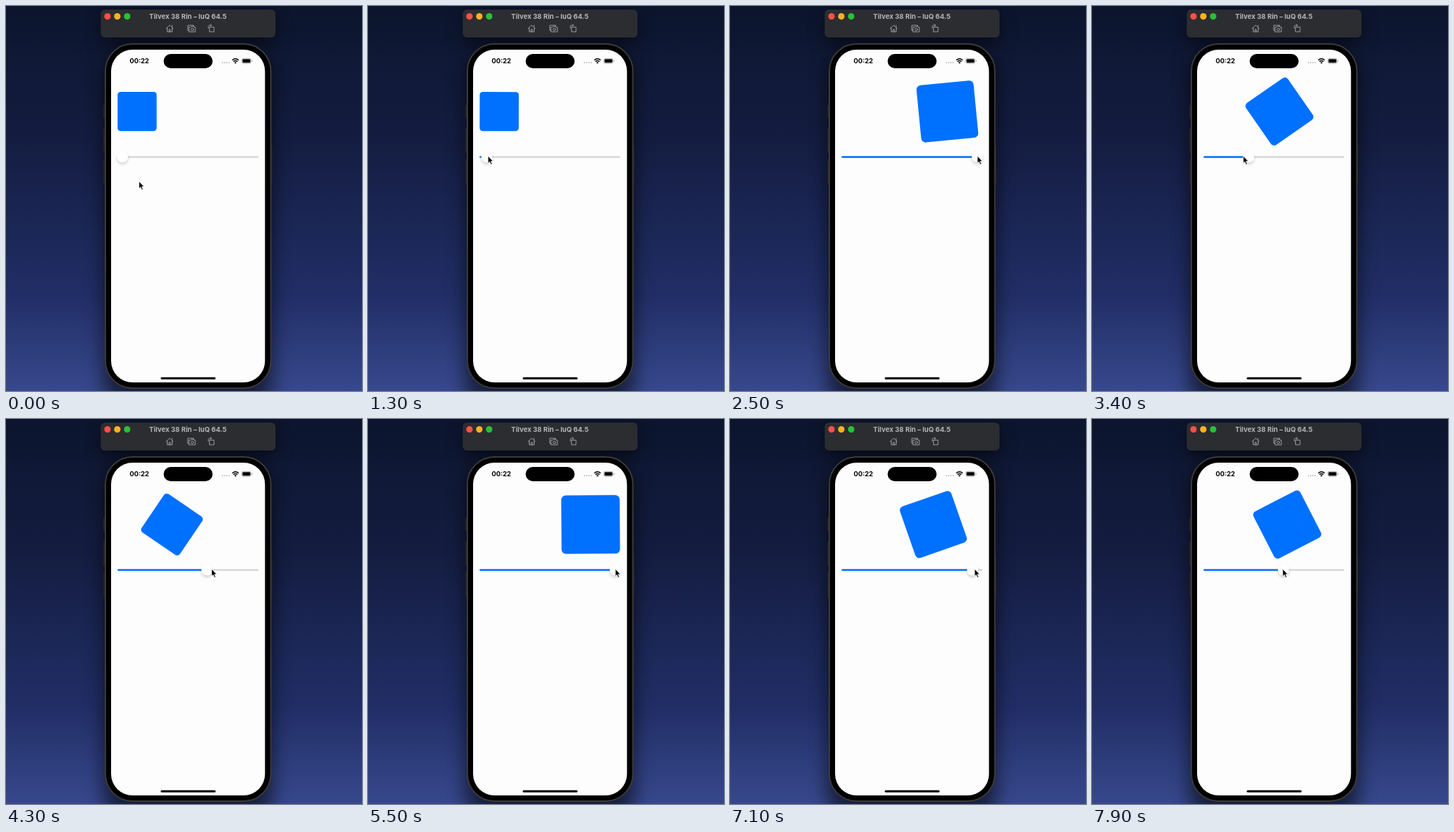
An HTML page for the animation above (8 s loop, 498 px wide and 538 px high).

```html
<!DOCTYPE html>
<html lang="en">
<head>
<meta charset="utf-8">
<title>Slider-driven square</title>
<style>
  html, body { margin: 0; width: 100%; height: 100%; overflow: hidden; background: #0c152d; }
  svg { display: block; width: 498px; height: 538px; }
  text { font-family: Inter, Roboto, sans-serif; font-weight: 700; }
</style>
</head>
<body>
<svg viewBox="0 0 498 538">
  <defs>
    <linearGradient id="sky" x2="0" y2="1">
      <stop offset="0" stop-color="#0c152d"/>
      <stop offset=".35" stop-color="#141d41"/>
      <stop offset=".75" stop-color="#212e66"/>
      <stop offset="1" stop-color="#37488c"/>
    </linearGradient>
    <filter id="glow" x="-40%" y="-30%" width="180%" height="160%"><feGaussianBlur stdDeviation="13"/></filter>
    <filter id="soft" x="-60%" y="-60%" width="220%" height="220%"><feGaussianBlur stdDeviation="2"/></filter>
  </defs>

  <rect width="498" height="538" fill="url(#sky)"/>
  <g opacity=".55" filter="url(#glow)">
    <rect x="136" y="64" width="237" height="500" rx="40"/>
    <rect x="134" y="12" width="242" height="40" rx="6"/>
  </g>

  <!-- Window bar -->
  <rect x="132.500" y="5" width="244.500" height="39" rx="6" fill="#2c2d31"/>
  <circle cx="142" cy="14.500" r="4.500" fill="#fe5146"/>
  <circle cx="155.700" cy="14.500" r="4.500" fill="#fdb225"/>
  <circle cx="169.500" cy="14.500" r="4.500" fill="#27c137"/>
  <text x="254.500" y="17.500" font-size="9.500" text-anchor="middle" fill="#b5b5b8">Tilvex 38 Rin – luQ 64.5</text>
  <g fill="none" stroke="#a5a5a8" stroke-width=".9" stroke-linejoin="round" stroke-linecap="round">
    <path d="M224 31.500l5-4.700 5 4.700M225.500 30.500v5.500h7v-5.500M228 36v-3.300h2V36M232.300 27v2"/>
    <path d="M256 34h-1.800v-7h8.300v1.500M256.300 29.500h2l1-1.200h2.600l1 1.200h2v6.600h-8.600z"/>
    <circle cx="260.600" cy="32.700" r="1.800"/>
    <path d="M285 29.500h6v6.500h-6zM283 31v-2.500q0-1.500 1.500-1.500h3M286 25.700l1.500 1.300-1.500 1.300"/>
  </g>

  <!-- Phone -->
  <g fill="#222328">
    <rect x="136" y="138" width="4" height="19" rx="1"/>
    <rect x="136" y="171" width="4" height="34" rx="1"/>
    <rect x="136" y="214" width="4" height="35" rx="1"/>
    <rect x="369" y="194" width="3.500" height="55" rx="1"/>
  </g>
  <rect x="139" y="53" width="231.500" height="481" rx="38" stroke="#3b3a38" stroke-width="2"/>
  <rect x="147" y="61" width="215.300" height="465" rx="30" fill="#fdfdfd"/>
  <rect x="220.500" y="67" width="68.500" height="20" rx="10"/>
  <text x="173" y="80" font-size="9.200">00:22</text>
  <path d="M302 79.200h11" stroke="#b4b4b4" stroke-width="1.500" stroke-dasharray="1.600 1.500"/>
  <path d="M316.500 75.700q4.500-4 9 0M318.200 77.700q2.800-2.400 5.600 0" fill="none" stroke="#000" stroke-width="1.500"/>
  <path d="M319.400 79q1.600-1.300 3.200 0l-1.600 1.700z"/>
  <rect x="329.800" y="73.300" width="13" height="7" rx="2.200" fill="none" stroke="#999" stroke-width=".7"/>
  <rect x="330.800" y="74.300" width="11" height="5" rx="1.300"/>
  <rect x="343.600" y="75.500" width="1" height="2.600" rx=".5" fill="#999"/>
  <rect x="216.500" y="518.700" width="76.700" height="3.100" rx="1.550"/>

  <rect id="square" x="-27.300" y="-27.300" width="54.600" height="54.600" rx="4.200" fill="#0070ff"/>

  <!-- Slider -->
  <rect x="156" y="209.800" width="197" height="2.400" rx="1.200" fill="#d7d7d9"/>
  <rect id="fill" x="156" y="209.800" height="2.400" rx="1.200" fill="#0070ff"/>
  <g id="thumb">
    <circle cy="2.500" r="7.500" opacity=".2" filter="url(#soft)"/>
    <circle r="7.800" fill="#fff"/>
  </g>

  <path id="cursor" d="M0 0V10.300L2.300 8.200 3.900 12 5.700 11.200 4.100 7.500H7.200Z" stroke="#fff" stroke-width=".8" stroke-linejoin="round"/>
</svg>

<script>
const LOOP = 8000, STEP = 100;
const STIFFNESS = 11.2;   // spring frequency, rad/s
const LEAD = 25;          // ms by which the pointer runs ahead of the thumb

// Each drag eases the slider to a new value.
const drags = [
  { start: 1200, end: 2480, to: 1 },
  { start: 2900, end: 3666, to: .04 },
  { start: 3800, end: 4560, to: .87 },
  { start: 4700, end: 5250, to: 1 },
  { start: 5600, end: 5930, to: .508 },
  { start: 6600, end: 7200, to: 1 },
  { start: 7310, end: 7950, to: .565 },
];

function ease(t, start, end) {
  const u = Math.min(1, Math.max(0, (t - start) / (end - start)));
  return u * u * (3 - 2 * u);
}

const slider = t => drags.reduce((v, d) => v + (d.to - v) * ease(t, d.start, d.end), 0);
const thumbX = t => 163 + 183 * slider(t);

// The square follows the slider on a critically damped spring.
function simulateSpring() {
  const samples = [], dt = .001;
  let p = 0, speed = 0;
  for (let t = 0; t < LOOP; t++) {
    if (t % STEP === 0) samples.push(p);
    speed += (STIFFNESS ** 2 * (slider(t) - p) - 2 * STIFFNESS * speed) * dt;
    p += speed * dt;
  }
  return samples;
}
const progress = simulateSpring();

const [square, fill, thumb, cursor] = ["square", "fill", "thumb", "cursor"].map(id => document.getElementById(id));
const move = (node, x, y, extra = "") => node.setAttribute("transform", `translate(${x} ${y}) ${extra}`);

function draw(now) {
  const step = Math.floor(now % LOOP / STEP), t = step * STEP;
  const p = progress[step], x = thumbX(t);
  move(square, 183.4 + 128.6 * p, 147.4, `rotate(${90 * p}) scale(${1 + p / 2})`);
  move(thumb, x, 211);
  fill.setAttribute("width", x - 156);
  fill.setAttribute("visibility", slider(t) > 0 ? "visible" : "hidden");
  const away = 1 - ease(t, 0, 900);
  move(cursor, thumbX(t + LEAD) + 23 * away, 209.5 + 35.5 * away);
  requestAnimationFrame(draw);
}
draw(performance.now());
</script>
</body>
</html>
```
